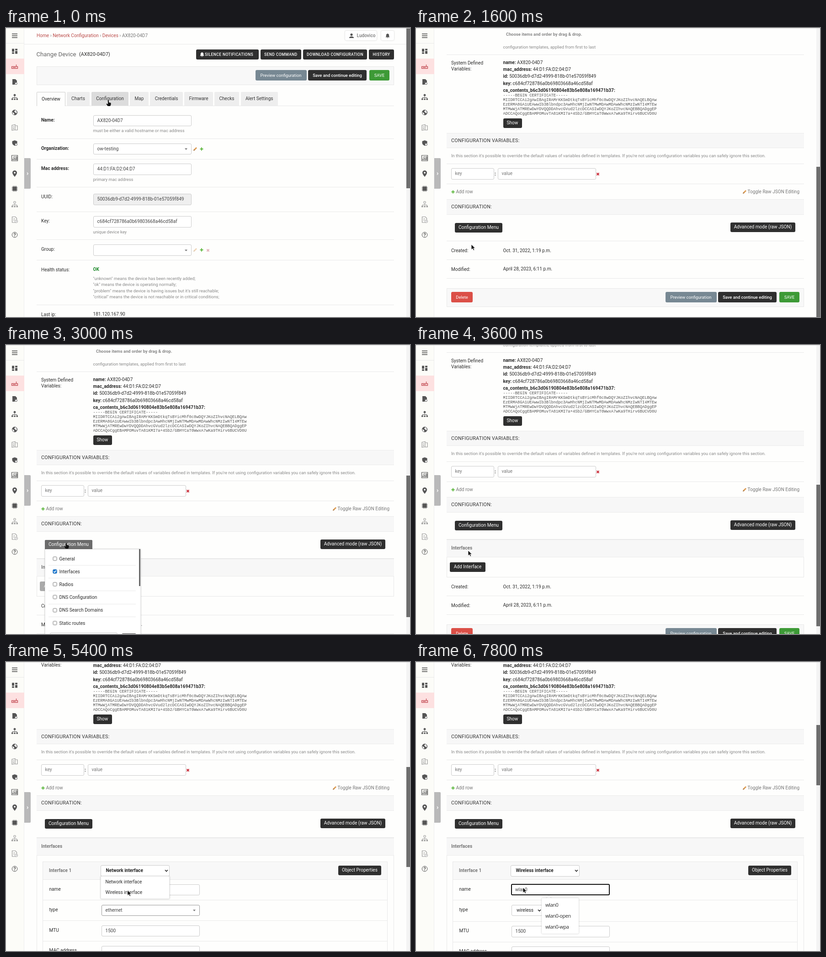
Write an HTML page that moves like this. It is 884 px wide and 633 px high and loops after 8000 ms.

```html
<!DOCTYPE html>
<html lang="en">
<head>
<meta charset="utf-8">
<title>Device configuration</title>
<style>
html, body { margin: 0; width: 100%; height: 100%; overflow: hidden; background: #fefefd; }
#stage { position: absolute; left: 0; top: 0; width: 884px; height: 633px; overflow: hidden; background: #fefefd; font: 10.08px/14px Roboto, sans-serif; color: #2b2b2b; }
#stage div, #stage p, #stage svg { position: absolute; box-sizing: border-box; margin: 0; white-space: pre; }
#stage svg { overflow: visible; }
#page { left: 0; top: 0; width: 884px; height: 3100px; }
.g { left: 0; top: 0; }
.b { font-weight: 700; }
.m { font-weight: 500; }
.help { font-size: 9.37px; color: #888; }
.gray { color: #777; }
.red { color: #ba4a48; }
.red i { font-style: normal; color: #777; }
.u { color: #ba4a48; text-decoration: underline; }
.ok { color: #1f8a2d; font-weight: 700; }
.title { font-size: 13.2px; color: #666; }
.sub { font-size: 10.8px; }
.sec { font-size: 10.8px; letter-spacing: .25px; color: #333; }
.mono { font: 8.75px/10.1px "Liberation Mono", monospace; color: #555; }
.ui { font: 500 11px/14px "Open Sans", sans-serif; letter-spacing: -.45px; }
.btn { display: flex; align-items: center; justify-content: center; border-radius: 3px; background: #2f2f2f; color: #fff; }
.up { font-size: 8.64px; font-weight: 500; letter-spacing: .36px; }
.s { font-size: 9.36px; }
.slate { background: #778893; }
.green { background: #3d9a36; }
.del { background: #db4f47; }
.hov { background: #6b6b6b; }
.pale { background: #aaa; }
.tab { background: #eee; color: #333; border-radius: 2px 2px 0 0; }
.tab.over { background: #dcdcdc; }
.tab.on { background: #fefefd; border: 1px solid #ccc; border-bottom: 0; color: #222; }
.in { border: 1px solid #ccc; border-radius: 3px; background: #fff; padding-left: 8px; display: flex; align-items: center; color: #444; }
.ro { background: #efefef; }
.dark { border-color: #999; }
.ph { color: #777; }
.kind { padding-left: 10.5px; color: #222; }
.focus { border: 2px solid #111; padding-left: 7px; }
.hr { height: 1px; background: #e9e9e9; }
.bar { background: #f7f7f7; border: solid #ebebeb; border-width: 1px 0; }
.panel { background: #f8f8f8; border: 1px solid #e8e8e8; }
.frame { border: 1px solid #e8e8e8; }
.chip { background: #fff; border-radius: 3px; box-shadow: 0 0 3px rgba(0,0,0,.22); }
.pop { background: #fff; box-shadow: 0 0 3px rgba(0,0,0,.28); border-radius: 2px; }
.tip { transform: rotate(45deg); }
.side { background: #fcfcf8; border-right: 1px solid #eee; }
.current { background: #fde1e1; }
.handle { background: #b9b9b9; border-radius: 0 2px 2px 0; }
.bubble { background: #d9dde1; border-radius: 0 3px 0 0; }
.track { background: #f4f4f4; }
.edge { background: #dcdcdc; }
#thumb { left: 876px; width: 8px; background: #6e6e6e; }
</style>
</head>
<body>
<div id="stage"></div>
<script>
const pos = (x, y, w, h) => `left:${x}px;top:${y}px;width:${w}px;height:${h}px`;
const text = (x, y, s, cls = '') => `<p class="${cls}" style="left:${x}px;top:${y - 7}px">${s}</p>`;
const box = (x, y, w, h, cls, s = '') => `<div class="${cls}" style="${pos(x, y, w, h)}">${s}</div>`;
const btn = (x, y, w, h, s, cls = '') => box(x, y, w, h, 'btn ' + cls, s);
const input = (x, y, w, s = '', cls = '') => box(x, y, w, 24.5, 'in ' + cls, s);
const hr = (y, x = 67, w = 782) => box(x, y, w, 1, 'hr');
const group = (key, y, s) => `<div class="g" ${key && `data-key="${key}"`} style="top:${y}px">${s}</div>`;
const svg = (x, y, s) => `<svg width="1" height="1" style="left:${x}px;top:${y}px">${s}</svg>`;
const line = (d, color, w = 1) => `<path d="${d}" fill="none" stroke="${color}" stroke-width="${w}"/>`;
const fill = (d, color) => `<path d="${d}" fill="${color}"/>`;

const plus = (x, y) => svg(x, y, line('M-3.5 0H3.5M0-3.5V3.5', '#62b944', 2.2));
const cross = (x, y, c) => svg(x, y, line('M-2.5-2.5L2.5 2.5M2.5-2.5L-2.5 2.5', c, 2.2));
const pencil = (x, y, o = 1) => svg(x, y, `<g opacity="${o}">${line('M-2 2L3-3', '#dc9c55', 2.8)}${fill('M-4 4L-3 .5L-.5 3Z', '#a5713c')}</g>`);
const arrow = (x, y) => svg(x, y, fill('M-3-1.5H3L0 2Z', '#777'));
const chevron = (x, y) => svg(x, y, line('M-3-1.5L0 1.5L3-1.5', '#222', 1.6));
const check = (x, y, state) => svg(x, y, `<rect x="-4" y="-4" width="8" height="8" rx="1.5"
  fill="${['#fff', '#1a78d0', '#ddd'][state]}" stroke="${['#767676', '#1a78d0', '#c4c4c4'][state]}"/>` +
  (state ? line('M-2.5 0L-.7 2L2.7-2', state > 1 ? '#999' : '#fff', 1.5) : ''));
const bell = (x, y, c) => svg(x, y, fill('M-4.5 3.2L-3.2 1.5V-1.2Q-3-4.2 0-4.8Q3-4.2 3.2-1.2V1.5L4.5 3.2ZM-1.4 4H1.4Q0 6-1.4 4Z', c));

const saveRow = y => btn(545.5, y, 112, 23, 'Preview configuration', 's slate') +
  btn(661, y, 128, 23, 'Save and continue editing', 's m') + btn(795, y, 44, 23, 'SAVE', 's green');

const tabs = active => {
  const first = active ? [[67, 62], [132, 50], [185, 83]] : [[67, 63], [133, 50], [187, 81]];
  const spans = [...first, [271, 41], [315, 72], [390, 63], [456, 54], [513.5, 81.5]];
  const names = ['Overview', 'Charts', 'Configuration', 'Map', 'Credentials', 'Firmware', 'Checks', 'Alert Settings'];
  return hr(170) + names.map((n, i) =>
    box(spans[i][0], 140, spans[i][1], i === active ? 31 : 30, 'btn tab' + (i === active ? ' on' : i === 2 ? ' over' : ''), n)).join('');
};

const header = hr(35, 40, 836) +
  text(67, 17, 'Home <i>›</i> Network Configuration <i>›</i> Devices <i>›</i> <i>AX820-04D7</i>', 'red') +
  box(742, 6, 69, 21, 'chip') + svg(756, 17, '<circle cy="-2.5" r="2.6" fill="#555"/>' + fill('M-5 5V3.5Q0-1 5 3.5V5Z', '#555')) +
  text(767.5, 17, 'Ludovico', 'm gray') + box(821, 6, 28, 21, 'chip') + bell(835, 16.5, '#555') +
  text(66.5, 57.5, 'Change Device', 'title') + text(160, 58, '(AX820-04D7)', 'sub') +
  btn(416, 47, 136.5, 22, '   SILENCE NOTIFICATIONS', 'up') + bell(429, 57.5, '#fff') +
  btn(556.5, 47, 89.5, 22, 'SEND COMMAND', 'up') + btn(650, 47, 140, 22, 'DOWNLOAD CONFIGURATION', 'up') +
  btn(794, 47, 55, 22, 'HISTORY', 'up') + box(66.5, 83.5, 782.5, 41, 'panel') + saveRow(92);

const overview = tabs(0) +
  text(77, 201.5, 'Name:', 'b') + input(190.5, 190.5, 215, 'AX820-04D7') +
  text(190.5, 225, 'must be either a valid hostname or mac address', 'help') + hr(242) +
  text(77, 263.5, 'Organization:', 'b') + input(190.5, 252.5, 215, 'ow-testing') + arrow(394, 265) + pencil(414, 265) + plus(428, 264.5) + hr(287) +
  text(77, 308, 'Mac address:', 'b') + input(190.5, 297, 215, '44:D1:FA:D2:04:D7') +
  text(190.5, 331.5, 'primary mac address', 'help') + hr(348) +
  text(77, 370, 'UUID:') + input(190.5, 363, 215, '50036db9-d7d2-4999-818b-01e57059f849', 'ro') + hr(402) +
  text(77, 423, 'Key:') + input(190.5, 412, 215, 'c684cf728786a0b69803668a46cd58af') +
  text(190.5, 446.5, 'unique device key', 'help') + hr(463) +
  text(77, 485, 'Group:') + input(190.5, 474, 215) + arrow(394, 486.5) + pencil(414, 486, .4) + plus(428, 486) + cross(441.5, 486.5, '#e3b5bb') + hr(508) +
  text(77, 529.5, 'Health status:') + text(190.5, 529, 'OK', 'ok') +
  ['"unknown" means the device has been recently added;', '"ok" means the device is operating normally;',
   '"problem" means the device is having issues but it\'s still reachable;',
   '"critical" means the device is not reachable or in critical conditions;']
    .map((s, i) => text(190.5, 549 + i * 13.4, s, 'help')).join('') +
  hr(606) + text(77, 627.5, 'Last ip:') + text(190.5, 627, '181.120.167.90');

const templates = ['SSH keys (required)', 'Management VPN (OpenVPN)', 'Management VPN (WireGuard)',
  'Mesh Demo (radio0: 2 GHz, radio1: 5 GHz)', 'Captive Portal Demo', 'Mesh WiFi6', 'Demo Open WiFi SSID',
  'Demo Encrypted WiFi SSID with roaming'];
const configTop =
  text(77, 182, 'Configuration:AX820-04D7', 'b gray') + check(807, 182, 0) + text(812, 182, 'Delete', 'gray') + hr(198) +
  text(77, 219, 'Backend:', 'b') + input(190.5, 208.5, 139, 'OpenWRT', 'kind') + chevron(322, 221) +
  text(190.5, 244.5, 'Select <span class="u">netjsonconfig</span> backend', 'help') + hr(261) +
  text(77, 282.5, 'Configuration status:') + text(190.5, 282, 'modified') +
  ['"modified" means the configuration is not applied yet;', '"applied" means the configuration is applied successfully;',
   '"error" means the configuration caused issues and it was rolled back;']
    .map((s, i) => text(190.5, 302 + i * 13.4, s, 'help')).join('') +
  hr(346) + text(77, 367, 'Templates:') +
  svg(195, 374.5, '<circle r="3" fill="none" stroke="#333" stroke-width="1.6"/>' + line('M2 2L5.5 5', '#333', 2)) +
  input(204, 363, 357, 'Filter', 'ph') + plus(575, 367.5) +
  templates.map((s, i) => check(195, 410 + i * 21.5, i ? +(i < 3) : 2) + text(203, 410.5 + i * 21.5, s)).join('');

const vars = [['name', 'AX820-04D7'], ['mac_address', '44:D1:FA:D2:04:D7'], ['id', '50036db9-d7d2-4999-818b-01e57059f849'],
  ['key', 'c684cf728786a0b69803668a46cd58af'], ['ca_contents_b6c3d06190804e83b5e808a169471b37', '']];
const cert = `-----BEGIN CERTIFICATE-----
MIIDRTCCAi2gAwIBAgIRAMrKKSmDtkqTsBYicMhf0c8wDQYJKoZIhvcNAQELBQAw
EzERMA8GA1UEAwwIb3Blbndpc3AwHhcNMjIwNTMwMDAwMDAwWhcNMzIwNTI4MTEw
MTMwWjATMREwDwYDVQQDDAhvcGVud2lzcDCCASIwDQYJKoZIhvcNAQEBBQADggEP
ADCCAQoCggEBAMPOMuvTA81KMI7a+4Sb2/GBHYCaT0WwxA7wKa9THirv6BUCVD0U`;
const configBottom =
  text(197, 13.5, 'Choose items and order by drag &amp; drop.', 'help b') +
  text(190.5, 41.5, 'configuration templates, applied from first to last', 'help') + hr(58) +
  text(77, 76.5, 'System Defined') + text(77, 90, 'Variables:') +
  vars.map(([k, v], i) => text(190.5, 75.5 + i * 15.4, `<b>${k}:</b> ${v}`)).join('') +
  `<div class="mono" style="${pos(190.5, 143, 340, 48.5)};overflow:hidden">${cert}</div>` +
  btn(190.5, 198, 41, 20.5, 'Show') +
  box(66.5, 230, 782.5, 33, 'bar') + text(77, 247, 'CONFIGURATION VARIABLES:', 'sec') +
  text(77, 280, "In this section it's possible to override the default values of variables defined in templates. If you're not using configuration variables you can safely ignore this section.", 'help') +
  hr(297) + input(76.5, 307, 94, 'key', 'ph') + text(172, 319.5, ':', 'b') + input(178.5, 307, 215, 'value', 'ph') + cross(398, 320, '#cc3340') + hr(341) +
  plus(81, 359) + text(87.5, 358.5, 'Add row', 'gray') + pencil(718.5, 358.5) + text(725.5, 358.5, 'Toggle Raw JSON Editing', 'gray') +
  box(66.5, 375, 782.5, 34, 'bar') + text(77, 392, 'CONFIGURATION:', 'sec') +
  btn(85, 427, 104, 20.5, 'Configuration Menu') + btn(688, 426, 142, 20.5, 'Advanced mode (raw JSON)');

const tail = hr(466) + text(77, 488, 'Created:') + text(190.5, 487.5, 'Oct. 31, 2022, 1:19 p.m.') + hr(507) +
  text(77, 529, 'Modified:') + text(190.5, 528, 'April 28, 2023, 6:11 p.m.') + hr(548) +
  box(66.5, 569.5, 782.5, 41, 'panel') + btn(77, 578, 47, 23, 'Delete', 's del') + saveRow(578);

const sectionHead = box(66.5, 467, 782.5, 40, 'bar') + box(66.5, 467, 782.5, 2, 'hr') + text(77, 487, 'Interfaces', 'b gray');
const addBtn = cls => btn(74, 518, 78, 20.5, 'Add Interface', cls);
const emptyList = box(66.5, 467, 782.5, 84, 'frame') + sectionHead + addBtn('pale');

const menuItems = ['General', 'Interfaces', 'Radios', 'DNS Configuration', 'DNS Search Domains', 'Static routes'];
const menu = box(85, 447, 210, 260, 'frame pop') + box(290.5, 447, 3.5, 81, 'hov') +
  menuItems.map((s, i) => check(107, 467.7 + i * 28.2, 0) + text(116.5, 468.5 + i * 28.2, s) +
    (i < 5 ? hr(482 + i * 28.2, 93, 191) : '')).join('') +
  input(96, 630, 147.5) + btn(253, 631.5, 32, 20, '');

const iface = box(66.5, 384, 782.5, 900, 'frame') + group('', -83, sectionHead) +
  box(80, 437, 755, 800, 'frame') + box(80, 437, 755, 40, 'panel') + text(94, 456.5, 'Interface 1', 'b gray') +
  btn(727, 446, 94, 20.5, 'Object Properties') + text(94.5, 498, 'name') + hr(521, 81, 753) + text(94.5, 543, 'type');
const kind = (name, d, type) => input(207, 445, 151, `<b>${name}</b>`, 'kind') + chevron(350.5, 457) + type +
  hr(566 + d, 81, 753) + text(94.5, 587.5 + d, 'MTU') + input(208.5, 576.5 + d, 215, '1500') + hr(611 + d, 81, 753) +
  text(94.5, 632 + d, 'MAC address') + input(208.5, 621.5 + d, 215);
const wired = kind('Network interface', 0, input(208.5, 486.5, 215) + input(208.5, 531.5, 215, 'ethernet', 'dark') + arrow(412, 544));
const wireless = kind('Wireless interface', 1.5, input(208.5, 486.5, 215) + input(208.5, 531.5, 68, 'wireless', 'kind') + chevron(269.5, 544));

const popup = (y, w, h, tipY, names) => box(286, tipY, 9, 9, 'tip pop') + box(275, y, w, h, 'pop') +
  names.map((s, i) => text(283, y + 14.5 + i * 24.15, s, 'ui')).join('');
const allNames = popup(330, 105, 150, 474, ['wlan0', 'tun0', 'lan', 'ztr4n2iebh', 'br-lan', 'tap_udp_nocrypt']);
const matches = popup(517, 81, 78, 514, ['wlan0', 'wlan0-open', 'wlan0-wpa']);
const options = box(207, 469, 151, 50, 'pop frame') + text(217.5, 482, 'Network interface') + text(217.5, 505, 'Wireless interface');
const status = box(-1, 0, 294, 22, 'bubble') + text(2, 7.5, 'cloud.openwisp.io/admin/config/device/.../change/', 'ui');

// Sidebar icons, each drawn around its own centre
const D = '#555', R = '#c5525a', G = '#999';
const circle = (x, y, r, c, f = 'none') => `<circle cx="${x}" cy="${y}" r="${r}" stroke="${c}" fill="${f}"/>`;
const tree = c => line('M0-1V2M-5 4V1.5H5V4', c) + fill('M-7 3.5H-3.5V6.5H-7ZM3.5 3.5H7V6.5H3.5ZM-1.7 3.5H1.7V6.5H-1.7Z', c);
const icons = [
  fill('M-6-5.5H-1V1H-6ZM1-5.5H6V-2H1ZM-6 2.2H-1V5.5H-6ZM1-.8H6V5.5H1Z', D),
  line('M-6.5 .5H6.5V4.5H-6.5ZM3.5 .5V-4', R, 1.3) + line('M-4 2.5H2', R),
  fill('M-5-6H1.5L5-2.5V0L0 6H-5Z', D) + circle(3, 3.5, 2.4, D, '#fff'),
  circle(0, -4, 2, D, D) + tree(D),
  circle(0, 0, 5.5, D, D) + fill('M-5-1L-1 2L-1 5Q-5 4-5-1ZM1-5Q5-4 4.5 2L1 0L-1-2Z', '#fff'),
  line('M-6-5L1-6.5V5L-6 6ZM2-4H6V5.5H1', G, 1.2) + line('M-4-2H-1M-4 1H-1M-4 3H-1', G),
  fill('M0-6L5.5-4V0Q5 4 0 6Q-5 4-5.5 0V-4Z', D) + circle(3, 3, 2.4, D, '#fff'),
  line('M-6.5-6H6.5V6H-6.5Z', D, 1.2) + line('M-4 4.5V1M-1 4.5V-1M2 4.5V0M4.5 4.5V-3', D, 1.6) + line('M-4-1L-1-3.5L2-2L5-4.5', D),
  fill('M0 7Q-5 1-5-2A5 5 0 0 1 5-2Q5 1 0 7Z', D) + circle(0, -2, 1.4, '#fff', '#fff'),
  fill('M-4.5-4.5H4.5V4.5H-4.5Z', D) + line('M-6.5-3H6.5M-6.5 0H6.5M-6.5 3H6.5M-3-6.5V6.5M0-6.5V6.5M3-6.5V6.5', D),
  line('M-2-6H2V-2H-2Z', G) + tree(G),
  line('M3 6H-5.5V-6.5H1.5L4.5-3V0M-3-2H1M-3 1H0', G, 1.2) + circle(3.5, 3.5, 3, G, '#fff') + line('M3.5 2V3.7H5', G),
  circle(0, 0, 5.8, D) + line('M-1.8-1.5Q-1.5-3.3 0-3.3Q2-3.2 1.8-1.5Q1.5-.5 0 .5V1.5M0 2.6V4', D, 1.3)
];
const sidebar = box(0, 0, 40, 633, 'side') + box(0, 67, 40, 34, 'current') + hr(33, 0, 40) +
  svg(19, 17, line('M-6-4H6M-6 0H6M-6 4H6', '#444', 1.4)) +
  icons.map((s, i) => svg(19, 50.5 + i * 33.55, s)).join('') +
  box(40, 285, 14, 67, 'handle') + svg(47, 319, line('M-1-2.5L1.2 0L-1 2.5', '#fff', 1.2));

const shapes = {
  hand: fill('M-1 0Q0-1 1 0V4L5.5 5V9L4 12H-1.5L-4.5 7.5L-3.5 6.5L-1 8Z', '#111'),
  pointer: '<path d="M0 0V11.5L2.8 9L4.8 13.2L6.8 12.2L4.8 8.2H8.5Z" fill="#111" stroke="#fff" stroke-width=".8"/>',
  beam: line('M-2.5-5.5H-.5L0-5L.5-5.5H2.5M0-5V5M-2.5 5.5H-.5L0 5L.5 5.5H2.5', '#333')
};

const stage = document.getElementById('stage');
stage.innerHTML = '<div id="page">' + header + group('o', 0, overview) +
  group('c', 0, tabs(2) + group('', 5, configTop) + group('', 583, configBottom)) +
  group('t', 583, `<div class="g" id="tail">${tail}</div>`) + group('e', 583, emptyList) + group('a', 583, addBtn('')) +
  group('h', 583, btn(85, 427, 104, 20.5, 'Configuration Menu', 'hov')) + group('m', 583, menu) + group('k', 583, check(107, 495.9, 1)) +
  group('i', 666, iface) + group('n', 666, wired) + group('w', 666, wireless) +
  group('f', 666, box(208, 486, 216, 25, 'in focus', '<span id="typed"></span>')) +
  group('|', 666, box(218, 492.5, 1, 12, 'btn')) + group('q', 666, options) + group('p', 666, allNames) + group('r', 666, matches) +
  '</div>' + sidebar + group('s', 613, status) + group('S', 622, status) +
  box(876, 0, 8, 633, 'track') + '<div id="thumb"></div>' + box(0, 0, 884, 1, 'edge') +
  '<svg id="cursor" width="1" height="1"></svg>';

// time, scroll, document height, visible parts, typed text
const scenes = [
  [0, 0, 1141, 'o'], [200, 0, 1141, 'os'], [400, 0, 1200, 'cst'], [800, 5, 1200, 'cSt'], [1000, 320, 1213, 'ct'],
  [1200, 583, 1213, 'ct'], [1800, 583, 1213, 'cth'], [2000, 583, 1337, 'cthm'], [2200, 583, 1337, 'ctm'],
  [2600, 583, 1292, 'ctmke'], [3000, 583, 1292, 'ctmkeh'], [3200, 583, 1292, 'cteah'], [3400, 583, 1292, 'ctea'],
  [3600, 625, 1292, 'ctea'], [3800, 659, 1292, 'ctea'], [4400, 666, 1830, 'cin'], [5200, 666, 1830, 'cinq'],
  [5600, 666, 3050, 'ciw'], [6000, 666, 3050, 'ciwfp|'], [6800, 666, 3050, 'ciwfr', 'w'],
  [7000, 666, 3050, 'ciwfr', 'wlan'], [7200, 666, 3050, 'ciwfr', 'wlan0']
];
// time, x, y, shape from then on
const path = [
  [0, 224, 159, 'hand'], [400, 222, 160, 'hand'], [600, 190, 206, 'pointer'], [800, 157, 246, 'pointer'],
  [1200, 126, 464, 'pointer'], [1600, 121, 474, 'pointer'], [1800, 128, 440, 'hand'], [2000, 131, 434, 'hand'],
  [2200, 120, 468, 'pointer'], [2400, 107, 494, 'pointer'], [2600, 107, 495, 'pointer'], [3000, 132, 434, 'hand'],
  [3200, 131, 434, 'hand'], [3400, 120, 450, 'pointer'], [3800, 107, 450, 'hand'], [4200, 105, 449, 'hand'],
  [4400, 105, 439, 'pointer'], [5000, 275, 455, 'pointer'], [5200, 275, 457, 'pointer'], [5400, 266, 500, 'pointer'],
  [5600, 264, 502, 'pointer'], [6000, 232, 504, 'beam'], [6400, 234, 496, 'beam'], [7600, 234, 496, 'beam'],
  [7800, 234, 494, 'pointer']
];

const [page, thumb, cursor, typed, tailBox] = ['page', 'thumb', 'cursor', 'typed', 'tail'].map(id => document.getElementById(id));
const parts = [...document.querySelectorAll('[data-key]')];
const last = (rows, t) => rows.findLastIndex(r => r[0] <= t);

function draw(t) {
  const [, scroll, height, shown, word = ''] = scenes[last(scenes, t)];
  page.style.top = -scroll + 'px';
  thumb.style.top = scroll * 633 / height + 'px';
  thumb.style.height = 633 * 633 / height + 'px';
  parts.forEach(p => p.style.display = shown.includes(p.dataset.key) ? '' : 'none');
  tailBox.style.top = shown.includes('e') ? '84px' : '0';
  typed.textContent = word;

  const i = last(path, t), a = path[i], b = path[i + 1] || a;
  const k = b === a ? 0 : (t - a[0]) / (b[0] - a[0]);
  cursor.style.left = a[1] + (b[1] - a[1]) * k + 'px';
  cursor.style.top = a[2] + (b[2] - a[2]) * k + 'px';
  cursor.innerHTML = shapes[a[3]];
}

const start = performance.now();
let drawn = -1;
function tick() {
  const t = Math.floor((performance.now() - start) % 8000 / 200) * 200;
  if (t !== drawn) draw(drawn = t);
  requestAnimationFrame(tick);
}
tick();
</script>
</body>
</html>
```
